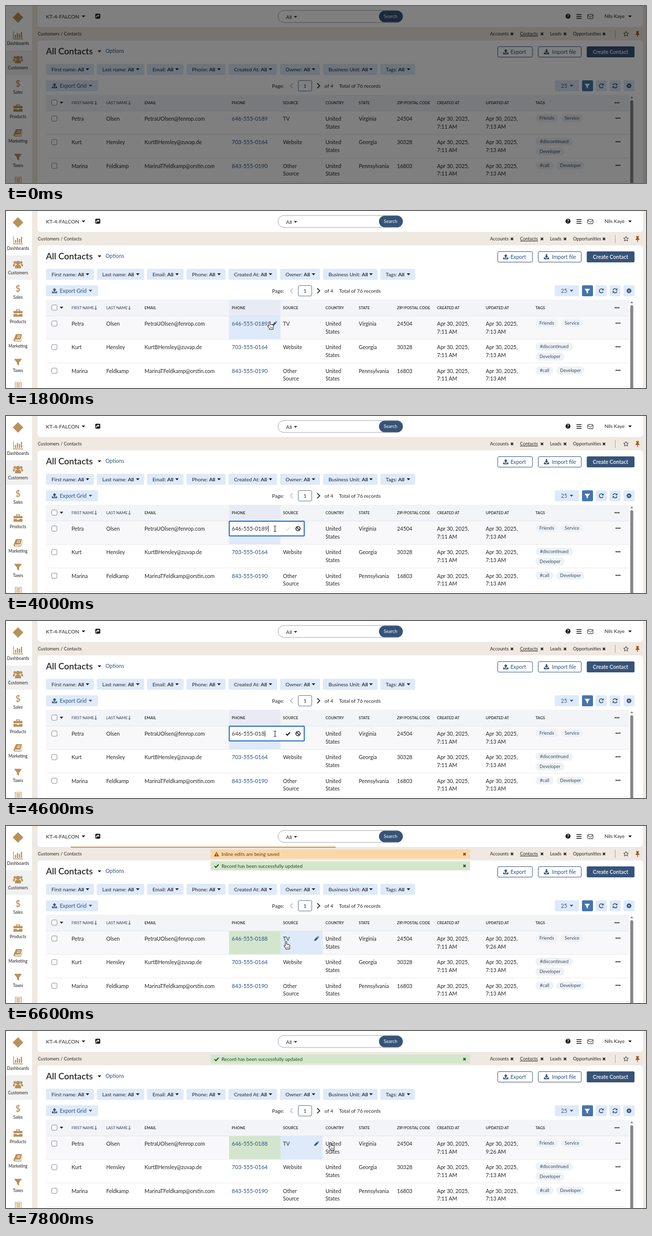
These frames come from a looping animation (1280 px wide and 355 px high, 8000 ms). An HTML page:

```html
<!DOCTYPE html>
<html lang="en">
<head>
<meta charset="utf-8">
<title>Inline editing in a contacts grid</title>
<style>
html, body { margin: 0; width: 100%; height: 100%; overflow: hidden; background: #efe9e2; }
svg { display: block; width: 100%; height: 100%; font: 10.6px Lato, "Open Sans", sans-serif; }
text { fill: #262626; white-space: pre; }
.nav { font-size: 8.5px; text-anchor: middle; fill: #222; }
.crumb { font-size: 9.2px; }
.user { font-size: 9.8px; }
.title { font-size: 17.5px; font-weight: 600; }
.filter { font-size: 10.3px; }
.page { font-size: 10.2px; }
.head { font-size: 7.7px; font-weight: 600; }
.sort { font-size: 7.8px; fill: #34435c; }
.link { fill: #2a5280; }
.tel { font-size: 11px; }
.tag { font-size: 9.2px; text-anchor: middle; fill: #3c4c60; }
.mid { text-anchor: middle; }
.white { fill: #fff; }
.note { font-size: 9.8px; }
.tip { font: 8.1px "Open Sans", sans-serif; }
.b { font-weight: 700; }
</style>
</head>
<body>
<svg id="stage" viewBox="0 0 1280 355"></svg>
<script>
const NAVY = '#375378', PALE = '#deeafa', GOLD = '#b8915a', INK = '#1c1c1c', LINE = '#e8e8ea';
const stage = document.getElementById('stage');

const rect = (x, y, w, h, fill, more = '') =>
  `<rect x="${x}" y="${y}" width="${w}" height="${h}" fill="${fill}" ${more}/>`;
const text = (x, y, s, cls = '', more = '') => `<text x="${x}" y="${y}" class="${cls}" ${more}>${s}</text>`;
const icon = (x, y, d, fill = INK) => `<path transform="translate(${x} ${y})" d="${d}" fill="${fill}"/>`;
const line = (x, y, d, color = INK, w = 1.5) =>
  `<path transform="translate(${x} ${y})" d="${d}" fill="none" stroke="${color}" stroke-width="${w}"/>`;
const group = (id, body) => `<g id="${id}">${body}</g>`;
const caret = (x, y, fill = INK) => icon(x, y, 'M-3.5-2h7L0 2z', fill);
const cross = (x, y, color = INK) => line(x, y, 'M-2.3-2.3 2.3 2.3M-2.3 2.3 2.3-2.3', color, 1.9);
const dots = (x, y) => [-3.5, 0, 3.5].map(d => `<circle cx="${x + d}" cy="${y}" r="1.3" fill="${INK}"/>`).join('');
const box = y => rect(91.5, y - 5.5, 10.5, 10.5, '#fff', 'rx="2" stroke="#7d8795"');
const outline = (x, w) => rect(x + .5, 81.5, w, 21, '#fff', `rx="2.5" stroke="${NAVY}"`);

const UP = 'M0-5.5 3.8-1.5H1.4V2H-1.4V-1.5H-3.8zM-5.2 1.2h2.6v1.8h5.2V1.2h2.6v3.6H-5.2z';
const DOWN = 'M0 2.2 3.8-1.6H1.4V-5.5H-1.4v3.9H-3.8zM-5.2 1.2h2.2L0 3.6 3 1.2h2.2v3.6H-5.2z';
const FUNNEL = 'M-7-6.5H7v1.5L2 1v6l-4-2.5V1L-7-5z';
const TICK = 'M-4 .3-1.3 3 4.2-2.8';
const PENCIL = 'M-4.5 4.5-4 1.5 1-3.5 3.5-1-1.5 4zM1.8-4.2 2.9-5.2 5.2-2.8 4.2-1.8z';
const WARN = 'M0-5 5.2 4.5H-5.2zM-.7-1.8v3.2H.7v-3.2zM-.7 2.2v1.3H.7V2.2z';

function sidebar() {
  const items = ['Dashboards', 'Customers', 'Sales', 'Products', 'Marketing', 'Taxes'];
  return rect(0, 0, 52, 355, '#fff') + rect(0, 89, 52, 49, '#f1f1f2') +
    `<rect x="-7.5" y="-7.5" width="15" height="15" fill="${GOLD}" transform="translate(24 23) rotate(45)"/>` +
    items.map((s, i) => text(24, 78 + i * 48.9, s, 'nav')).join('') +
    line(24, 59, 'M-9-8V7H10', GOLD, 1.3) + line(24, 59, 'M-5 5V-1M-1 5V-5M3 5V-3M7 5V-7', GOLD, 2.4) +
    icon(24, 107, 'M-4-3a4 4 0 1 1 8 0 4 4 0 1 1-8 0M-6 8V5q0-4 4-4h4q4 0 4 4v3z' +
      'M-9-4a2.6 2.6 0 1 1 5.2 0 2.6 2.6 0 1 1-5.2 0M3.8-4A2.6 2.6 0 1 1 9-4 2.6 2.6 0 1 1 3.8-4' +
      'M-10 4V1q0-2 3-2h2q-2 2-2 5zM10 4V1q0-2-3-2H5q2 2 2 5z', GOLD) +
    text(24, 162, '$', 'mid', `style="font-size:18px;font-weight:600;fill:${GOLD}"`) +
    icon(24, 205, 'M-9-4.5h5V-7.5H4v3h5V0H-9zM-2.5-4.5h5V-6h-5zM-9 1.5h7V3h4V1.5h7V7H-9z', GOLD) +
    icon(24, 254, 'M-4-7H8L5 4H-6q-1 2 1 2H6L9-4V-2L6.500 7.500H-6q-4 0-2.500-4.500zM-1-4-1.500-2.800h6L5-4zM-2-1-2.500.2h6L4-1z', GOLD) +
    icon(24, 303, FUNNEL, GOLD) +
    rect(18.5, 343.5, 12, 16, 'none', `stroke="${GOLD}"`) +
    line(24.500, 347, 'M-4 0H4M-4 4H4M-4 8H4', GOLD, 2);
}

function topBar() {
  const tabs = [['Accounts', 968, 1012], ['Contacts', 1028, 1072], ['Leads', 1088, 1118], ['Opportunities', 1134, 1196]];
  return rect(63, -8, 1211, 50, '#fff', 'rx="6"') +
    text(80, 24.500, 'KT-4-FALCON', '', 'style="font-size:10.4px"') + caret(155, 21) +
    rect(178.500, 15.500, 10, 10, INK, 'rx="2"') + line(183, 20.500, 'M-2.500 3V1.500Q-2.500-1 1-1', '#fff', 1.4) +
    icon(183, 20.500, 'M.5-3.500 4-1 .5 1.500z', '#fff') +
    rect(544, 9, 249.500, 24, '#fff', 'rx="12" stroke="#a2a2a2"') + text(560, 25.500, 'All', 'page') + caret(579, 22, '#444') +
    rect(746, 9.500, 47.500, 23, NAVY, 'rx="11.5"') + text(769, 24, 'Search', 'crumb mid white') +
    `<circle cx="1124" cy="20.5" r="5" fill="${INK}"/>` + text(1124, 23.500, '?', 'mid white b', 'style="font-size:8.5px"') +
    line(1146, 21, 'M-5-3.800H5M-5 0H5M-5 3.800H5', INK, 1.5) +
    rect(1163.500, 17, 10.500, 8.500, 'none', `rx="1" stroke="${INK}"`) + line(1168.700, 21, 'M-5-2.500 0 1.500 5-2.500', INK, 1) +
    text(1197, 24, 'Nils Kaye', 'user') + caret(1248, 21) +
    text(63.500, 59, 'Customers / Contacts', 'crumb') +
    tabs.map(([s, x, c], i) => text(x, 59, s, 'crumb', i == 1 ? 'text-decoration="underline"' : '') + cross(c, 56)).join('') +
    line(1218.500, 48, 'M0 0V16', '#a7a39d', 1) +
    line(1240, 56, 'M0-5 1.500-1.700 5-1.500 2.300.8 3.200 4.300 0 2.400-3.200 4.300-2.300.8-5-1.500-1.500-1.700z', '#333', 1) +
    icon(1263, 56, 'M-3-5.500H3v1.500H2V-1Q4 0 4 2H.7V6H-.7V2H-4Q-4 0-2-1V-4h-1z', '#a75418');
}

function toolbar() {
  const filters = [['First name', 80, 176], ['Last name', 181.500, 276.500], ['Email', 282, 355], ['Phone', 361, 439],
    ['Created At', 445, 542], ['Owner', 548, 628], ['Business Unit', 634, 743], ['Tags', 748.500, 818]];
  return text(80, 97, 'All Contacts', 'title') + caret(187, 91) + text(199, 94, 'Options', 'link') +
    outline(983, 69.500) + icon(999.500, 92, UP, NAVY) + text(1009, 96, 'Export', 'link') +
    outline(1064, 86) + icon(1081, 92, DOWN, NAVY) + text(1092, 96, 'Import file', 'link') +
    rect(1161.500, 81, 95.500, 22, NAVY, 'rx="2.5"') + text(1209, 96, 'Create Contact', 'mid white', 'font-weight="600"') +
    filters.map(([s, l, r]) => rect(l, 116, r - l, 22, PALE, 'rx="2.5"') +
      text(l + 11, 131, `${s}: <tspan class="b">All</tspan>`, 'filter') + caret(r - 13, 127)).join('') +
    rect(80, 149, 104, 22, PALE, 'rx="2.5"') + icon(97, 160, UP, NAVY) + text(107.500, 164, 'Export Grid', 'link') + caret(169, 160, NAVY) +
    text(532, 164, 'Page:', 'page') + line(571, 160, 'M2.500-5-2 0 2.500 5', '#bbb', 1.6) +
    rect(584.500, 149.500, 27, 21, '#fff', 'rx="2.5" stroke="#5b7394"') + text(598, 164, '1', 'page mid') +
    line(625, 160, 'M-2.500-5 2.500 0-2.500 5', '#333', 1.8) +
    text(637, 164, 'of 4', 'page') + text(666, 164, 'Total of 76 records', 'page') +
    rect(1097.500, 149, 48.500, 22, PALE, 'rx="2.5"') + text(1110, 164, '25', 'link') + caret(1131, 160, NAVY) +
    [1152, 1179.500, 1207, 1235].map((x, i) => rect(x, 149, 22, 22, i ? PALE : '#4674ae', 'rx="2.5"')).join('') +
    `<g transform="translate(1162.500 160.500) scale(.7)">${icon(0, 0, FUNNEL, '#fff')}</g>` +
    line(1190.500, 160, 'M3.200-2.500A4 4 0 1 0 3.600 2', NAVY, 1.6) + icon(1190.500, 160, 'M4.800-5V-.8H.6z', NAVY) +
    line(1218, 160, 'M-4-1A4 4 0 0 1 3.500-2M4 1A4 4 0 0 1-3.500 2', NAVY, 1.6) +
    icon(1218, 160, 'M4.800-5V-1H.8zM-4.800 5V1H-.8z', NAVY) +
    `<circle cx="1246" cy="160" r="2.8" fill="none" stroke="${NAVY}" stroke-width="2.4"/>` +
    line(1246, 160, 'M0-5V-3M0 3V5M-5 0H-3M3 0H5M-3.500-3.500-2.300-2.300M3.500 3.500 2.300 2.300M-3.500 3.500-2.300 2.300M3.500-3.500 2.300-2.300', NAVY, 1.8);
}

const HEADS = [['FIRST NAME', 131], ['LAST NAME', 200.500], ['EMAIL', 277], ['PHONE', 451.500], ['SOURCE', 554], ['COUNTRY', 639],
  ['STATE', 705.500], ['ZIP/POSTAL CODE', 782], ['CREATED AT', 862], ['UPDATED AT', 959.500], ['TAGS', 1059]];
const ROWS = [
  ['Petra', 'Olsen', 'PetraUOlsen@fenrop.com', '', 'TV', 'Virginia', '24504'],
  ['Kurt', 'Hensley', 'KurtBHensley@zuvap.de', '703-555-0164', 'Website', 'Georgia', '30328'],
  ['Marina', 'Feldkamp', 'MarinaTFeldkamp@orstin.com', '843-555-0190', 'Other|Source', 'Pennsylvania', '16803']];
const TAGS = [['Friends', 1059, 45, 217], ['Service', 1110, 44, 217], ['#discontinued', 1059, 75, 264],
  ['Developer', 1059, 58, 284], ['#call', 1059, 36, 312], ['Developer', 1101, 56, 312]];

function grid() {
  const heads = HEADS.map(([s, x], i) => text(x, 197, s, i < 2 ? 'sort' : 'head')).join('');
  const rows = ROWS.map((r, i) => {
    const y = 230 + i * 47.300;
    const cells = [...r.slice(0, 5), 'United|States', ...r.slice(5), 'Apr 30, 2025,|7:11 AM', 'Apr 30, 2025,|7:13 AM'];
    return box(y - 4) + dots(1224, y - 5) + rect(80, y + 27, 1166, 1, LINE) +
      cells.map((c, k) => c.split('|').map((s, n) =>
        text(HEADS[k][1], y + n * 15.500, s, k == 3 ? 'link tel' : '', !i && k == 9 && n ? 'id="updated"' : '')).join('')).join('');
  }).join('');
  return rect(80, 178, 1166, 32, '#f2f4f7') + rect(80, 210, 1166, 1, '#e1e5eb') +
    group('row', rect(80, 211, 1166, 46, '#f8f8fa')) +
    rect(446, 178, 103, 32, '#e8ebf6', 'id="headTint"') +
    rect(446, 211, 103, 46, PALE, 'id="phoneCell"') + rect(549, 211, 84, 46, PALE, 'id="sourceCell"') +
    box(194) + caret(111, 194) + dots(1222, 194) + heads +
    [179.500, 247].map(x => line(x, 194, 'M0-4V3.500M-2 1.500 0 3.800 2 1.500', '#34435c', 1)).join('') + rows +
    TAGS.map(([s, x, w, y]) => rect(x, y, w, 16, '#eef2f6', 'rx="8"') + text(x + w / 2, y + 11, s, 'tag')).join('') +
    rect(1248.500, 189, 6, 170, '#868686', 'rx="3"') + icon(1251.500, 183, 'M-3 2H3L0-2z', '#868686');
}

const banner = (id, fill, ink, mark, s) => group(id, rect(409, 47, 519, 18.500, fill) + mark +
  text(431, 60, s, 'note', `style="fill:${ink}"`) + cross(917, 56.500, ink));

const overlays = () =>
  group('pencil', icon(0, 0, PENCIL, NAVY)) +
  group('editor', rect(446.500, 211, 150, 29.500, '#fff', 'rx="1" stroke="#1f66c4" stroke-width="2"') +
    `<g id="ok">${line(564, 226, TICK, INK, 2.2)}</g>` +
    `<circle cx="584" cy="226" r="4.2" fill="none" stroke="${INK}" stroke-width="1.6"/>` + line(584, 226, 'M-3-3 3 3', INK, 1.6)) +
  text(451.500, 230, '', 'tel', 'id="phone"') + rect(0, 220, 1, 12, INK, 'id="bar"') +
  group('spinner', line(0, 0, 'M2.500-3.500A4.300 4.300 0 0 1 0 4.300', GOLD, 1.4)) +
  rect(0, 41.500, 0, 2, '#c08d45', 'id="progress"') +
  banner('saving', '#f9d8a6', '#6b3d10', icon(421, 56.500, WARN, '#a55312'), 'Inline edits are being saved') +
  banner('saved', '#d3e7cd', '#1f4a25', line(421, 56.500, TICK, '#1d5a2a', 2.2), 'Record has been successfully updated') +
  group('tip', rect(567.500, 243.500, 108, 15.500, '#fff', 'stroke="#777"') + text(573, 254, 'Double click on cell to edit', 'tip')) +
  group('arrow', icon(0, 0, 'M0 0V13L3 10 5 14.500 7 13.600 5 9.300H9z', '#000')) +
  group('hand', '<path d="M-1.300 0Q0-1.200 1.200 0V5L6 6Q8 6.500 7.800 8.500L7 12V15H-.5V13L-4 8.500Q-4 6.500-2.500 7.500L-1.300 8.800z" fill="#fff" stroke="#111"/>' +
    line(0, 0, 'M2 10V13M4.500 10V13', '#111', .8)) +
  group('beam', line(0, 0, 'M-2.500-5.500Q0-5.500 0-4.500Q0-5.500 2.500-5.500M0-5V5M-2.500 5.500Q0 5.500 0 4.500Q0 5.500 2.500 5.500', '#222', 1.1)) +
  rect(0, 0, 1280, 355, '#000', 'id="dim" opacity=".5"');

stage.innerHTML = rect(0, 0, 1280, 355, '#efe9e2') + sidebar() + topBar() +
  rect(63, 69, 1211, 300, '#fff', 'rx="6"') + toolbar() + grid() + overlays();

const el = {};
stage.querySelectorAll('[id]').forEach(e => el[e.id] = e);
const show = (id, on) => el[id].style.display = on ? '' : 'none';
const move = (id, x, y, r = 0) => el[id].setAttribute('transform', `translate(${x} ${y}) rotate(${r})`);
const fade = (id, v) => { show(id, v > 0); el[id].setAttribute('opacity', v); };
const ramp = (t, a, b) => Math.min(1, Math.max(0, (t - a) / (b - a)));

const PATH = [[800, 600, 120], [1400, 520, 220], [2400, 538, 226], [5000, 538, 226], [5600, 560, 232], [7400, 560, 232], [7800, 649, 224]];
function pointer(t) {
  const i = Math.max(1, PATH.findIndex(p => p[0] >= t));
  const [a, x, y] = PATH[i - 1], [b, u, v] = PATH[i], k = ramp(t, a, b);
  return [x + (u - x) * k, y + (v - y) * k];
}

function draw(ms) {
  const t = Math.floor(ms / 200) * 200;
  const editing = t >= 2600 && t < 5400, done = t >= 6400, left = t >= 5400;

  show('dim', t < 200);
  show('row', t >= 1400);
  show('headTint', t >= 1200 && t < 6200);
  show('phoneCell', t >= 1400);
  el.phoneCell.setAttribute('fill', done ? '#d3e6cd' : left ? '#f3f3f4' : PALE);
  show('sourceCell', left);
  show('pencil', t >= 1400 && !editing);
  move('pencil', left ? 621 : 537, 226);

  show('editor', editing);
  el.ok.setAttribute('opacity', t < 4400 ? .12 : 1);
  el.phone.textContent = '646-555-018' + (t < 4400 ? '9' : t < 4800 ? '' : '8');
  el.phone.style.fill = editing ? '#333' : '#2a5280';
  show('bar', t >= 3200 && editing);
  el.bar.setAttribute('x', 452 + el.phone.getComputedTextLength());

  show('spinner', left && !done);
  move('spinner', 539, 226, (t - 5800) * .36);
  el.updated.textContent = done ? '9:26 AM' : '7:13 AM';

  const k = (t - 5800) / 1200, x = 78 + 77 * k;
  show('progress', t >= 5800 && t < 7200);
  el.progress.setAttribute('x', x);
  el.progress.setAttribute('width', Math.max(0, 128 + 797 * k - x));

  fade('saving', t < 6600 ? ramp(t, 5200, 5600) : 1 - ramp(t, 6600, 7040));
  fade('saved', ramp(t, 6200, 6600));
  move('saved', 0, 23.500 * (1 - ramp(t, 7000, 7400)));
  show('tip', t >= 6800 && t < 7600);

  const p = pointer(t);
  show('arrow', t >= 800 && t < 1400);
  show('hand', t >= 1400 && !editing);
  show('beam', editing);
  ['arrow', 'hand', 'beam'].forEach(id => move(id, ...p));
}

function loop() {
  draw(performance.now() % 8000);
  requestAnimationFrame(loop);
}
loop();
</script>
</body>
</html>
```
